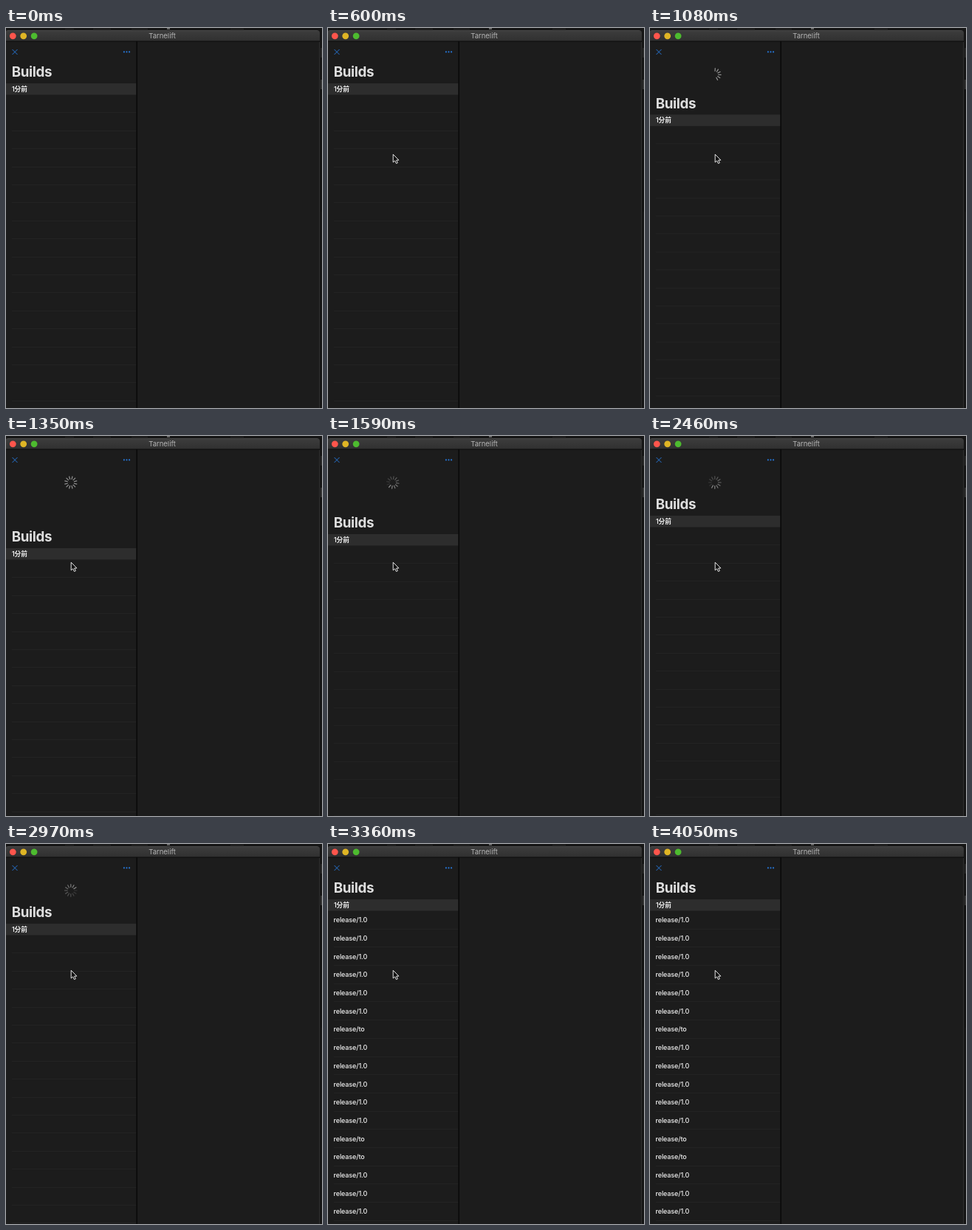
Write an HTML page with a canvas that moves like this. It is 428x515 px and loops after 4080 ms.

```html
<!DOCTYPE html>
<html lang="ja">
<head>
<meta charset="utf-8">
<style>
html, body { margin: 0; width: 100%; height: 100%; overflow: hidden; background: #1c1c1c; }
canvas { display: block; }
</style>
</head>
<body>
<canvas id="stage" width="428" height="515"></canvas>
<script>
const ctx = document.getElementById('stage').getContext('2d');
const LOOP = 4080, STEP = 30;
const RELOAD = 3030, SETTLED = 3300;
const PULLED = 77, RESTING = 33;
const BRANCH_ROWS = [6, 12, 13];
const FONT = 'Inter, "Noto Sans CJK JP", "Noto Sans CJK", sans-serif';
const ARROW = new Path2D('M.2.2V11L2.7 8.9L4.4 12.6L6.3 11.8L4.7 8.1H7.9Z');

const ramp = (t, a, b) => Math.min(1, Math.max(0, (t - a) / (b - a)));
const smooth = x => x * x * (3 - 2 * x);
const easeOut = x => 1 - (1 - x) ** 3;

function rect(x, y, w, h, color) {
  ctx.fillStyle = color;
  ctx.fillRect(x, y, w, h);
}

function dot(x, y, r, color) {
  ctx.fillStyle = color;
  ctx.beginPath();
  ctx.arc(x, y, r, 0, 7);
  ctx.fill();
}

function topRounded(h, fill) {
  ctx.beginPath();
  ctx.roundRect(-1, 3, 426, h, [4, 4, 0, 0]);
  ctx.fillStyle = fill;
  ctx.fill();
}

function text(str, x, y, size, weight, color, spacing = 0, align = 'left') {
  ctx.font = `${weight} ${size}px ${FONT}`;
  ctx.letterSpacing = spacing + 'px';
  ctx.textAlign = align;
  ctx.fillStyle = color;
  ctx.fillText(str, x, y);
}

function line(x1, y1, x2, y2, color, width) {
  ctx.strokeStyle = color;
  ctx.lineWidth = width;
  ctx.beginPath();
  ctx.moveTo(x1, y1);
  ctx.lineTo(x2, y2);
  ctx.stroke();
}

function drawWindow() {
  rect(0, 0, 428, 515, '#151515');
  for (const [x, w] of [[80, 12], [118, 24], [170, 22], [304, 18]]) rect(x, 1, w, 1, '#2a2a2a');
  rect(218, 0, 4, 2, '#666');
  rect(426, 27, 2, 13, '#282828');
  rect(426, 70, 2, 13, '#343434');
  rect(426, 83, 2, 166, '#111');

  topRounded(520, '#1c1c1c');
  const bar = ctx.createLinearGradient(0, 3, 0, 18);
  bar.addColorStop(0, '#3d3d3d');
  bar.addColorStop(1, '#303030');
  topRounded(15, bar);
  rect(2, 3, 420, 0.7, '#505050');
  rect(0, 17.5, 425, 1, '#0b0b0b');
  rect(424, 19, 1, 496, '#303030');

  ['#ff554c', '#dfb525', '#4dbb2f'].forEach((c, i) => dot(9.3 + i * 14.4, 10.8, 4.4, c));
  text('Tarnelift', 211.5, 14.3, 9.5, 400, '#b6b6b6', 0, 'center');
}

function drawNav() {
  const blue = '#2674d2';
  line(8.5, 29, 15.5, 36, blue, 1);
  line(15.5, 29, 8.5, 36, blue, 1);
  for (let i = 0; i < 3; i++) dot(159.9 + i * 3.6, 32.4, 1.1, blue);
}

function drawList(offset, loaded) {
  ctx.save();
  ctx.translate(0, offset);
  text('Builds', 7.7, 66.2, 18.8, 700, '#dedede', -0.35);
  rect(0, 75, 176.5, 15.5, '#2d2d2d');
  text('1分前', 7.9, 86, 8.7, 600, '#f0f0f0');
  const pitch = loaded ? 24.69 : 24.4;
  for (let i = 0; i < 18; i++) {
    const y = 90.5 + i * pitch;
    rect(8, Math.round(y + pitch - 0.5), 168.5, 1, '#232323');
    if (loaded) {
      const name = BRANCH_ROWS.includes(i) ? 'release/to' : 'release/1.0';
      text(name, 7.6, y + 15.8, 9, 500, '#f2f2f2', -0.12);
    }
  }
  ctx.restore();
}

function drawSpinner(t, offset) {
  const pull = ramp(t, 900, 1260), gone = ramp(t, RELOAD, SETTLED);
  if (!pull || gone === 1) return;
  const head = Math.floor((t - 1950) / 75 + 0.5);
  ctx.save();
  ctx.translate(87.8, 63);
  ctx.scale(1 - gone, 1 - gone);
  // pulling past the resting place turns the whole wheel by half a spoke
  ctx.rotate(ramp(offset, RESTING, PULLED) * Math.PI / 12 + gone * 1.5);
  ctx.lineCap = 'round';
  for (let i = 0; i < 12; i++) {
    const age = ((head - i) % 12 + 12) % 12;
    const alpha = t < 1440 ? 0.6 * ramp(pull * 12, i, i + 1) : 0.56 - 0.04 * age;
    ctx.globalAlpha = alpha * (1 - gone);
    line(0, -4.7, 0, -8.3, '#e4e4e4', 1.2);
    ctx.rotate(Math.PI / 6);
  }
  ctx.restore();
}

function drawCursor(t) {
  if (t < 150) return;
  const away = 1 - easeOut(ramp(t, 150, 540));
  ctx.save();
  ctx.translate(88 + 85 * away, 171 + 200 * away);
  ctx.fillStyle = '#111';
  ctx.strokeStyle = '#e8e8e8';
  ctx.lineWidth = 1;
  ctx.lineJoin = 'round';
  ctx.fill(ARROW);
  ctx.stroke(ARROW);
  ctx.restore();
}

function scrollOffset(t) {
  const pulled = PULLED * smooth(ramp(t, 840, 1290));
  const release = (PULLED - RESTING) * smooth(ramp(t, 1440, 1770));
  return (pulled - release) * (1 - smooth(ramp(t, RELOAD, SETTLED)));
}

function draw(now) {
  const t = Math.floor(now % LOOP / STEP) * STEP;
  const offset = scrollOffset(t);
  drawWindow();
  drawList(offset, t >= RELOAD);
  drawSpinner(t, offset);
  drawNav();
  rect(176.5, 18, 1.5, 497, '#090909');
  drawCursor(t);
}

const start = performance.now();
function frame() {
  draw(performance.now() - start);
  requestAnimationFrame(frame);
}
frame();
</script>
</body>
</html>
```
